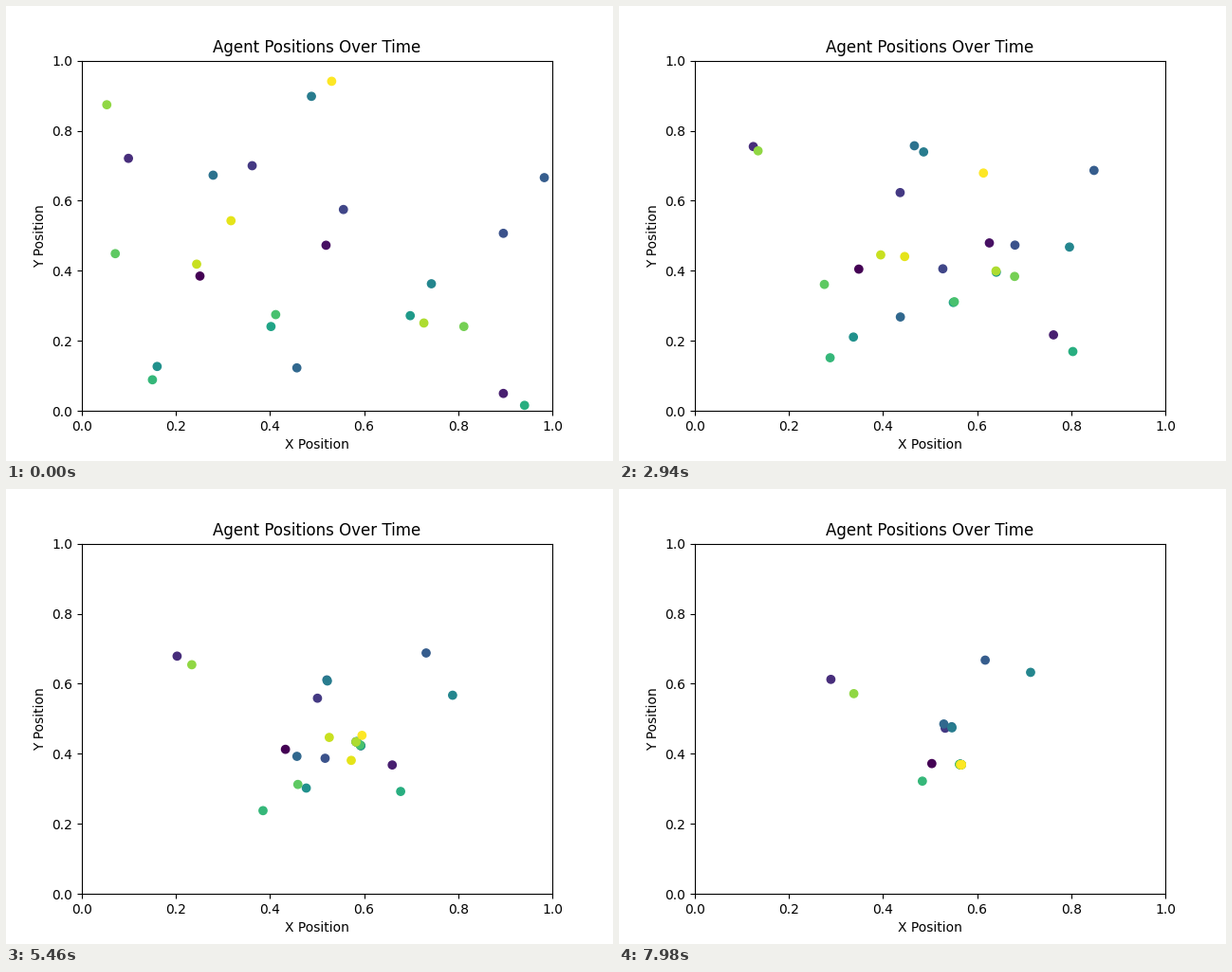
Write a matplotlib script that moves like this. It is 640 by 480 pixels and loops after 8000 ms.

```python
import numpy as np
import matplotlib.pyplot as plt
from matplotlib.animation import FuncAnimation

STEP_MS, TICK_MS, LOOP_MS = 60, 20, 8000
STEPS = -(-LOOP_MS // STEP_MS)

# Per agent: start x and y (thousandths), pace (1e-5 per step), agent chased
AGENTS = [
    (251, 385, 203, 6), (519, 473, 219, 6), (896, 50, 437, 21),
    (99, 721, 260, 20), (362, 700, 218, 19), (556, 575, 357, 17),
    (896, 507, 446, 18), (983, 666, 278, 20), (457, 123, 301, 9),
    (279, 673, 455, 10), (488, 898, 325, 14), (743, 363, 242, 7),
    (160, 127, 400, 14), (698, 272, 420, 21), (402, 241, 350, 17),
    (941, 16, 422, 5), (150, 89, 310, 21), (412, 275, 304, 21),
    (71, 449, 454, 15), (812, 241, 400, 1), (53, 874, 317, 22),
    (727, 251, 356, 1), (244, 419, 313, 1), (317, 543, 336, 2),
    (531, 941, 561, 19),
]


def advance(pos):
    """Each agent in turn steps straight at its prey, stopping on it."""
    pos = list(pos)
    for i, (_, _, pace, prey) in enumerate(AGENTS):
        gap = pos[prey] - pos[i]
        reach = pace / 1e5
        pos[i] += gap if abs(gap) <= reach else gap / abs(gap) * reach
    return pos


def offsets(pos):
    return [(p.real, p.imag) for p in pos]


path = [[complex(x, y) / 1000 for x, y, *_ in AGENTS]]
while len(path) < STEPS:
    path.append(advance(path[-1]))

fig, ax = plt.subplots(figsize=(6.4, 4.8), dpi=100)
dots = ax.scatter(*zip(*offsets(path[0])), c=range(len(AGENTS)), cmap="viridis")
ax.set(xlim=(0, 1), ylim=(0, 1), title="Agent Positions Over Time",
       xlabel="X Position", ylabel="Y Position")


def update(tick):
    dots.set_offsets(offsets(path[tick * TICK_MS // STEP_MS]))
    return dots,


anim = FuncAnimation(fig, update, frames=LOOP_MS // TICK_MS,
                     interval=TICK_MS, repeat=True, repeat_delay=0)
plt.show()
```
